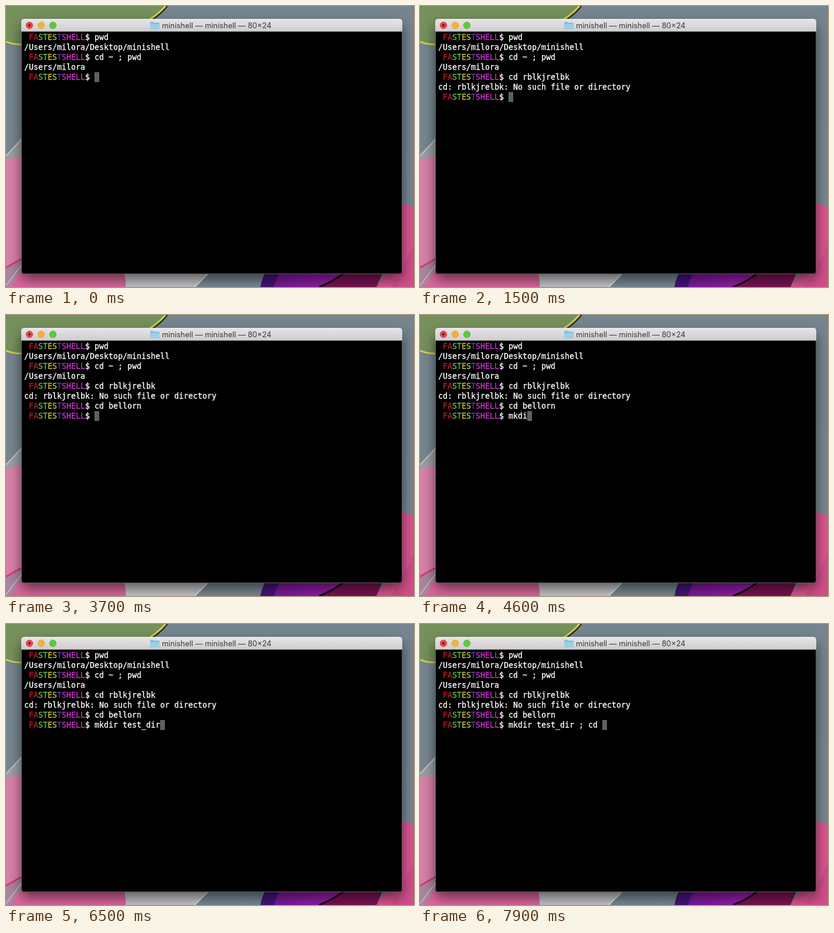
An HTML page with a canvas that plays this animation: 696x480 px, repeating every 8000 ms.

```html
<!DOCTYPE html>
<html lang="en">
<head>
<meta charset="utf-8">
<title>minishell</title>
<style>
  html, body { margin: 0; width: 100%; height: 100%; overflow: hidden; background: #6f7f8a; }
  svg, canvas { position: absolute; left: 0; top: 0; width: 696px; height: 480px; }
</style>
</head>
<body>
<svg viewBox="0 0 696 480">
  <defs>
    <linearGradient id="slate" x2="0" y2="1">
      <stop offset="0" stop-color="#75858f"/><stop offset="1" stop-color="#788993"/>
    </linearGradient>
    <linearGradient id="bar" x2="0" y2="1">
      <stop offset="0" stop-color="#e7e5e7"/><stop offset="1" stop-color="#cfcdcf"/>
    </linearGradient>
    <linearGradient id="violet">
      <stop offset="0" stop-color="#7b1a9c"/><stop offset="1" stop-color="#a51fae"/>
    </linearGradient>
    <filter id="soft" x="-20%" y="-20%" width="140%" height="140%">
      <feGaussianBlur stdDeviation="11"/>
    </filter>
  </defs>

  <!-- Desktop -->
  <rect width="696" height="480" fill="url(#slate)"/>
  <path d="M0 0H272Q261 13 246 23L28 66Q12 66 0 61Z" fill="#76905c"/>
  <g fill="none">
    <path d="M275 0Q264 14 248 24" stroke="#2c3020" stroke-width="3"/>
    <path d="M272 0Q261 13 245 23M0 61Q12 66 28 66" stroke="#cfd04c" stroke-width="3"/>
  </g>
  <path d="M0 257L28 224V480H0Z" fill="#9b9ea1"/>
  <path d="M0 256L28 226" stroke="#c3c5c8" stroke-width="2"/>
  <path d="M0 264Q12 258 28 257V432L0 446Z" fill="#d880a9"/>
  <path d="M0 446L28 430V480H0Z" fill="#a8869f"/>
  <path d="M0 447L28 431" stroke="#d63a78" stroke-width="3"/>
  <path d="M0 478L28 440" stroke="#d3a9c0" stroke-width="2"/>
  <path d="M8 480L28 450H200Q205 468 204 480Z" fill="#db679c"/>
  <path d="M200 450Q205 468 204 480H322L352 450Z" fill="#c3c4c7"/>
  <path d="M322 480L350 452" stroke="#dedfe1" stroke-width="2"/>
  <path d="M434 480Q437 462 446 450H480L458 480Z" fill="#451478"/>
  <path d="M457 480Q462 463 470 450H600L568 480Z" fill="url(#violet)"/>
  <path d="M536 480Q562 470 582 450H645L632 480Z" fill="#7b1253"/>
  <path d="M534 480Q560 470 580 453" fill="none" stroke="#17091d" stroke-width="3"/>
  <path d="M632 480Q640 462 660 448V336Q682 334 696 345V480Z" fill="#dc5591"/>
  <path d="M670 458Q688 430 696 402V480H656Z" fill="#d14e8a"/>

  <!-- Window -->
  <rect x="26" y="33" width="650" height="434" rx="8" opacity=".55" filter="url(#soft)"/>
  <rect x="26" y="22" width="650" height="436" rx="5"/>
  <rect x="26.5" y="22.5" width="649" height="435" rx="5" fill="none" stroke="#5a5a5c"/>
  <path d="M26 43V27Q26 22 31 22H671Q676 22 676 27V43Z" fill="url(#bar)"/>
  <path d="M31 22.5H671" stroke="#f0eff0"/>
  <path d="M26 43.5H676" stroke="#8d8b8d"/>
  <g stroke-width=".7">
    <circle cx="40" cy="33" r="5.8" fill="#e9454c" stroke="#cf3940"/>
    <circle cx="60" cy="33" r="5.8" fill="#f1b23d" stroke="#d89d2e"/>
    <circle cx="80" cy="33" r="5.8" fill="#5bca3e" stroke="#45a930"/>
  </g>
  <circle cx="40" cy="33" r="2" fill="#690f0d"/>
  <path d="M246 28Q246 27 247 27H251L253 28.5H261Q262 28.5 262 30V39Q262 40 261 40H247Q246 40 246 39Z" fill="#84c0da"/>
  <path d="M246 31H262V39Q262 40 261 40H247Q246 40 246 39Z" fill="#9bcfe5"/>
  <text x="266" y="38" fill="#3a383a" font-size="12.85" font-family="Inter, sans-serif">minishell — minishell — 80×24</text>
</svg>
<canvas id="screen" width="696" height="480"></canvas>

<script>
const LOOP = 8000;
const LEFT = 31, TOP = 45, CELL = 8, LINE = 17;
const PROMPT = [
  [" FA", "#b4222f"], ["ST", "#58c840"], ["ES", "#c4c33c"],
  ["T", "#4a38e0"], ["SHELL", "#c934ca"], ["$ ", "#ffffff"]
];

// Each session entry: command, key press times, time of Enter, output.
const session = [
  { command: "pwd", output: "/Users/milora/Desktop/minishell" },
  { command: "cd ~ ; pwd", output: "/Users/milora" },
  {
    command: "cd rblkjrelbk",
    keys: [100, 200, 300, 500, 600, 600, 700, 700, 800, 800, 900, 1000, 1000],
    enter: 1300,
    output: "cd: rblkjrelbk: No such file or directory"
  },
  {
    command: "cd bellorn",
    keys: [2000, 2100, 2200, 2400, 2500, 2600, 2700, 3000, 3100, 3200],
    enter: 3600
  },
  {
    command: "mkdir test_dir ; cd ",
    keys: [4200, 4300, 4500, 4600, 4700, 4900, 5300, 5400, 5500, 5600,
           6000, 6200, 6300, 6400, 6900, 7000, 7200, 7500, 7600, 7800],
    enter: Infinity
  }
];

const ctx = document.getElementById("screen").getContext("2d");
ctx.font = "13.3px 'DejaVu Sans Mono', monospace";
ctx.lineWidth = 0.3;

function write(text, column, row, color = "#ffffff") {
  ctx.fillStyle = ctx.strokeStyle = color;
  [...text].forEach((char, i) => {
    const x = LEFT + (column + i) * CELL, y = TOP + row * LINE + 13;
    ctx.fillText(char, x, y);
    ctx.strokeText(char, x, y);
  });
  return column + text.length;
}

function draw(time) {
  ctx.clearRect(0, 0, 696, 480);
  let row = 0;
  for (const { command, keys, enter = 0, output } of session) {
    let column = 0;
    for (const [text, color] of PROMPT) column = write(text, column, row, color);
    const typed = keys ? keys.filter(key => key <= time).length : command.length;
    column = write(command.slice(0, typed), column, row);
    if (time < enter) {
      ctx.fillStyle = "#606060";
      ctx.fillRect(LEFT + column * CELL, TOP + row * LINE, CELL, LINE);
      return;
    }
    row++;
    if (output) write(output, 0, row++);
  }
}

const start = performance.now();
function tick() {
  draw((performance.now() - start) % LOOP);
  requestAnimationFrame(tick);
}
tick();
</script>
</body>
</html>
```
